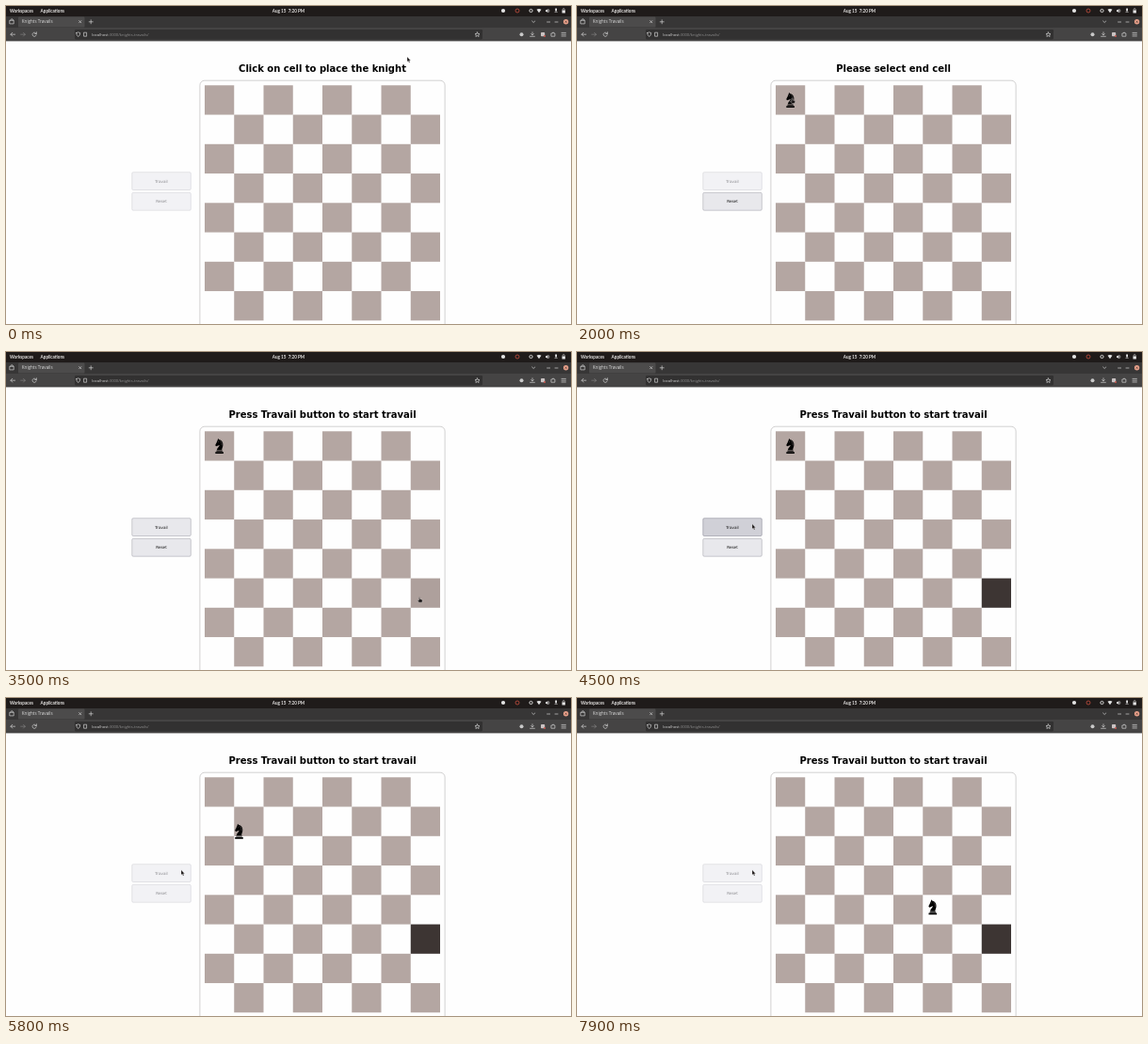
Recreate the animation shown at these times as an HTML page. Size 600x338 px, loop 8 s.

```html
<!DOCTYPE html>
<html lang="en">
<head>
<meta charset="utf-8">
<title>Knights Travails</title>
<style>
html, body { margin: 0; height: 100%; overflow: hidden; background: #fefefe; }
svg { display: block; width: 100vw; height: 100vh; }
text { font-family: "Open Sans", "Noto Sans", sans-serif; white-space: pre; }
.os { font: 700 4.6px Lato, sans-serif; fill: #e9e7e6; }
.page { font-family: "DejaVu Sans", sans-serif; text-anchor: middle; }
.line { fill: none; stroke: #d0d0d0; stroke-width: .7; stroke-linecap: round; stroke-linejoin: round; }
</style>
</head>
<body>
<svg viewBox="0 0 600 338">
  <!-- desktop bar -->
  <rect width="600" height="11" fill="#1f1b1a"/>
  <text class="os" x="4" y="6.7">Workspaces</text>
  <text class="os" x="36.6" y="6.7">Applications</text>
  <text class="os" x="300" y="6.7" text-anchor="middle">Aug 15  7:20 PM</text>
  <circle cx="528" cy="5" r="2.1" fill="#e4e4e4"/>
  <circle cx="543" cy="5" r="2" fill="none" stroke="#b5493c" stroke-width=".9"/>
  <circle cx="557.5" cy="5" r="1.6" fill="none" stroke="#e4e4e4" stroke-width=".9"/>
  <path d="M563.5 3.8Q566 2 568.5 3.8L566 7.2ZM573 4.2h1l1.5-1.3v4.4L574 6h-1ZM583.2 2.6h1.8v3h-1.8ZM582.5 6.2h3.2v.6h-3.2ZM590.5 4.6h3.4v2.8h-3.4Z" fill="#e4e4e4"/>
  <path class="line" d="M576.6 3.8q.8 1.2 0 2.5M591.2 4.4v-.8a1 1 0 0 1 2 0v.8"/>

  <!-- browser -->
  <rect y="11" width="600" height="12.5" fill="#373636"/>
  <rect x="13" y="11.6" width="70.5" height="11" rx="1.2" fill="#4c4b4b"/>
  <rect y="23" width="600" height="14.4" fill="#454444"/>
  <rect x="73" y="25" width="433" height="10.4" rx="1.3" fill="#323131"/>
  <text x="16.8" y="18.4" font-size="4.55" fill="#dedede">Knights Travails</text>
  <text x="91.3" y="31.8" font-size="4.15" fill="#8f8f8f"><tspan fill="#d8d8d8">localhost</tspan>:3000/knights-travails/</text>
  <path class="line" d="M4.2 15.3h4v3.6h-4ZM4.8 15.2l.7-1.3h1.5l.7 1.3M77.6 15.6l2.2 2.2m0-2.2l-2.2 2.2M88.2 16.8h4m-2-2v4M558.6 16l1.6 1.5 1.6-1.5M574.6 17h3M583 17h3
    M9.6 30.2H5m1.8-1.9L5 30.2l1.8 1.9M32.1 29.4a2.1 2.1 0 1 0 .1 1.5M32.4 27.8v1.7h-1.7M74.7 28.6l2-.7 2 .7q0 2.8-2 4-2-1.2-2-4ZM83 28.2h2.6v4H83Z
    M500.5 27.9l.8 1.6 1.7.2-1.3 1.1.4 1.7-1.6-.9-1.6.9.4-1.7-1.3-1.1 1.7-.2Z
    M559 27.8v3m-1.3-1.2l1.3 1.3 1.3-1.3M556.6 32.3h4.8M579.3 29h1.2v-.8h1.2v.8h1.2v3.2h-3.6ZM590 28.4h4.4M590 30.2h4.4M590 32h4.4"/>
  <path class="line" d="M15.7 30.2h4.6m-1.8-1.9l1.8 1.9-1.8 1.9" opacity=".4"/>
  <circle cx="594.6" cy="16.8" r="2.7" fill="#e8a08a"/>
  <path d="M593.6 15.8l2 2m0-2l-2 2" stroke="#3a2c28" stroke-width=".6"/>
  <circle cx="547.5" cy="30.2" r="2" fill="#c8c8c8"/>
  <rect x="568" y="28" width="4.2" height="4.2" rx=".8" fill="#c9c2c2"/>
  <circle cx="572" cy="32" r="1" fill="#c9584f"/>

  <!-- page -->
  <text id="title" class="page" x="336" y="69.7" font-size="10" font-weight="700"></text>
  <g id="buttons"></g>
  <rect x="205.9" y="79.2" width="260.2" height="270" rx="5" fill="#fefefe" stroke="#b4b2b2" stroke-width=".6"/>
  <g id="board"></g>
  <g id="knight">
    <path d="M-1.5-8L-.2-6.7C2.8-6.2 4.2-3.2 3.7-.2 3.4 1.8 2.4 2.8 2.7 4.3H-2.7C-2.7 2-.1.9.2-1.3-1-.5-2-.7-2.8.4L-4.3-.4C-4.5-2-2.9-3.2-2.5-5Q-1.7-6.4-1.5-8ZM-3.2 4.8H3.2V5.8H-3.2ZM-4.3 6.2H4.3V8H-4.3Z"/>
    <path d="M-1.6-4.3l.9-.4M.8-5.4Q3-3.8 2.5-.6" fill="none" stroke="#b4a6a2" stroke-width=".35"/>
  </g>
  <path id="arrow" d="M0 0V5.2L1.2 4.2 2 6.2 3 5.8 2.2 3.9H3.7Z" fill="#1b1717" stroke="#eee" stroke-width=".3"/>
  <path id="hand" d="M-.6.4Q0-.4.6.4V2L3 2.6Q3.6 3.6 2.7 5.6H-.4L-2 3.4-1.5 2.8-.6 3.4Z" fill="#1b1717" stroke="#e6e0de" stroke-width=".4"/>
</svg>
<script>
const LOOP = 8000, STEP = 100, CELL = 31.25, LEFT = 211, TOP = 84.3;
const PLACE = 1900, TARGET = 3500, PRESS = 5300, START = 5400;
const $ = id => document.getElementById(id);

function add(parent, tag, attrs, text = '') {
  const el = document.createElementNS('http://www.w3.org/2000/svg', tag);
  for (const k in attrs) el.setAttribute(k, attrs[k]);
  el.textContent = text;
  return parent.appendChild(el);
}

function makeButton(label, y) {
  const box = add($('buttons'), 'rect', {x: 133.8, y, width: 62.5, height: 18.8, rx: 1.3, 'stroke-width': .6});
  const text = add($('buttons'), 'text', {class: 'page', x: 165, y: y + 10.8, 'font-size': 4.17}, label);
  return {box, text, y};
}
const travail = makeButton('Travail', 176.7), reset = makeButton('Reset', 198.4);

let goal;
for (let row = 0; row < 8; row++)
  for (let col = row % 2; col < 8; col += 2) {
    const cell = add($('board'), 'rect', {x: LEFT + col * CELL, y: TOP + row * CELL, width: CELL, height: CELL, fill: '#b4a6a2'});
    if (row === 5 && col === 7) goal = cell;
  }

const clamp = v => Math.max(0, Math.min(1, v));
const mix = (a, b, k) => a + (b - a) * k;

// cubic-bezier(.42, 0, .58, 1)
function easeInOut(x) {
  x = clamp(x);
  let lo = 0, hi = 1;
  for (let i = 0; i < 20; i++) {
    const s = (lo + hi) / 2;
    if (1.26 * s * (1 - s) ** 2 + 1.74 * s * s * (1 - s) + s ** 3 < x) lo = s; else hi = s;
  }
  return lo * lo * (3 - 2 * lo);
}

// Each move: start, end, x, y
function follow(t, x, y, moves) {
  for (const [from, to, nx, ny] of moves) {
    const k = easeInOut((t - from) / (to - from));
    x = mix(x, nx, k);
    y = mix(y, ny, k);
  }
  return [x, y];
}

const mouseMoves = [
  [400, 1200, 228.5, 98], [2000, 2500, 414, 255], [2600, 3100, 439, 260.6],
  [3500, 4100, 193.5, 179.5], [4200, 4500, 186, 182.8]
];
const hops = [[5500, 6000, 1, 2], [6500, 7000, 3, 3], [7500, 8000, 5, 4]];

function paint(btn, enabled, hover, pressed) {
  const fill = !enabled ? '#f2f2f5' : pressed ? '#b1b1b9' : hover ? '#d0d0d7' : '#e8e8ec';
  btn.box.setAttribute('fill', fill);
  btn.box.setAttribute('stroke', !enabled ? '#d3d3d9' : hover ? '#8f8f9d' : '#a9a9b2');
  btn.text.setAttribute('fill', enabled ? '#111' : '#8c8c90');
}

function draw(t) {
  $('title').textContent = t < PLACE ? 'Click on cell to place the knight'
    : t < TARGET ? 'Please select end cell' : 'Press Travail button to start travail';

  const [mx, my] = follow(t, 426, 54, mouseMoves);
  const onBoard = mx > LEFT && mx < LEFT + 8 * CELL && my > TOP;
  $('arrow').style.display = onBoard ? 'none' : '';
  $('hand').style.display = onBoard ? '' : 'none';
  $(onBoard ? 'hand' : 'arrow').setAttribute('transform', `translate(${mx} ${my})`);

  const over = b => mx > 133.8 && mx < 196.3 && my > b.y && my < b.y + 18.8;
  paint(travail, t >= TARGET && t < START, over(travail), t >= PRESS);
  paint(reset, t >= PLACE && t < START, over(reset), false);

  const k = easeInOut((t - TARGET + 80) / 500);
  goal.setAttribute('fill', `rgb(${mix(180, 61, k)},${mix(166, 53, k)},${mix(162, 51, k)})`);

  const [col, row] = follow(t, 0, 0, hops);
  $('knight').style.display = t < PLACE ? 'none' : '';
  $('knight').setAttribute('transform', `translate(${LEFT + (col + .5) * CELL} ${TOP + (row + .5) * CELL})`);
}

const begin = performance.now();
function tick() {
  const t = (performance.now() - begin) % LOOP;
  draw(Math.floor(t / STEP) * STEP);
  requestAnimationFrame(tick);
}
tick();
</script>
</body>
</html>
```
